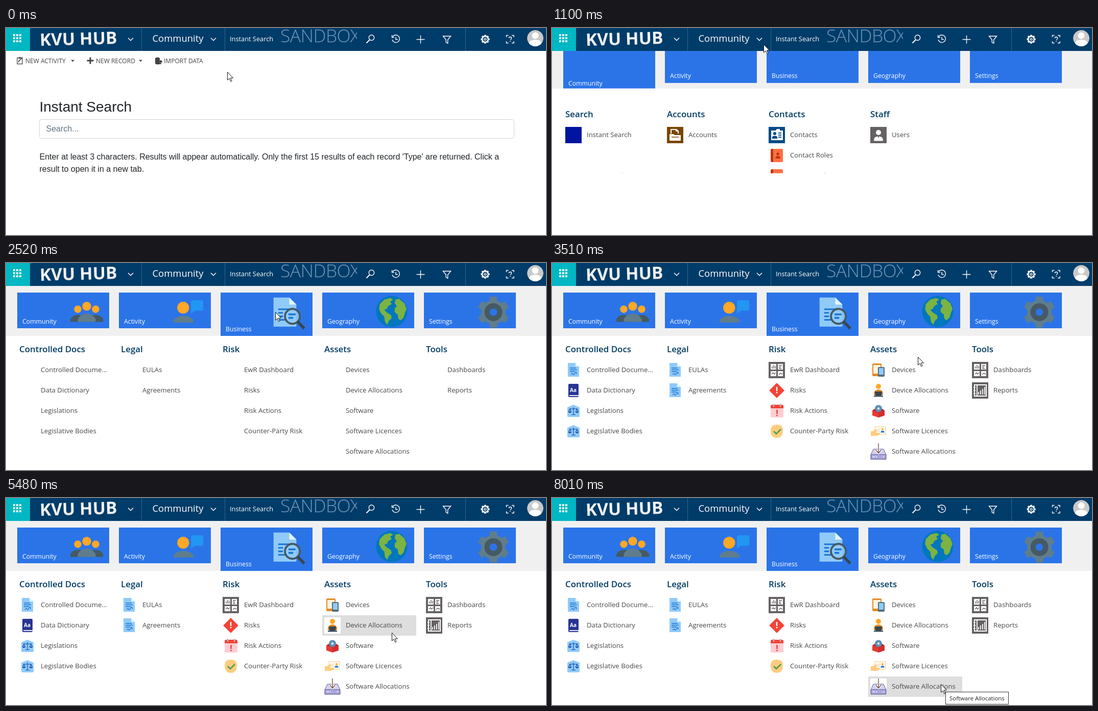
These frames come from a looping animation (1057x406 px, 8.46 s). An HTML page:

```html
<!DOCTYPE html>
<html lang="en">
<head>
<meta charset="utf-8">
<title>Instant Search</title>
<style>
html, body { margin: 0; width: 100%; height: 100%; overflow: hidden; background: #fff; }
svg { display: block; }
text { font-family: "Open Sans", "Noto Sans", sans-serif; white-space: pre; }
.page { font: 16px "Liberation Sans", Arial, sans-serif; fill: #212529; }
.head { font-size: 16.9px; font-weight: 600; fill: #003a63; }
.item { font-size: 13.2px; fill: #484848; }
.label { font-size: 12.3px; font-weight: 500; fill: #fff; }
.cmd { font-size: 12px; fill: #444; }
.tip { font-size: 11.4px; fill: #222; }
.line { fill: none; stroke: #fff; stroke-width: 1.4; }
</style>
</head>
<body>
<svg id="stage" width="1057" height="406" viewBox="0 0 1057 406"></svg>
<script>
const LOOP = 8460;
const BLUE = '#2b74e8';
const stage = document.getElementById('stage');

const rect = (x, y, w, h, fill, more = '') => `<rect x="${x}" y="${y}" width="${w}" height="${h}" fill="${fill}" ${more}/>`;
const circle = (x, y, r, fill, more = '') => `<circle cx="${x}" cy="${y}" r="${r}" fill="${fill}" ${more}/>`;
const path = (d, fill, more = '') => `<path d="${d}" fill="${fill}" ${more}/>`;
const stroke = (d, color, w = 1.5) => path(d, 'none', `stroke="${color}" stroke-width="${w}"`);
const text = (x, y, cls, s, more = '') => `<text x="${x}" y="${y}" class="${cls}" ${more}>${s}</text>`;
const group = (x, y, body, more = '') => `<g transform="translate(${x} ${y})" ${more}>${body}</g>`;
const bust = (x, y, r, head, body) => circle(x, y, r, head) +
  path(`M${x - 1.75 * r} ${y + 3.3 * r}v${-0.5 * r}q0 ${-1.3 * r} ${1.75 * r} ${-1.3 * r}t${1.75 * r} ${1.3 * r}v${0.5 * r}z`, body);
const gear = (x, y, r, n, fill) => {
  let out = circle(x, y, r * 0.78, fill);
  for (let i = 0; i < n; i++)
    out += path(`M${x - r * 0.27} ${y - r * 0.7}L${x - r * 0.21} ${y - r}H${x + r * 0.21}L${x + r * 0.27} ${y - r * 0.7}z`, fill,
      `transform="rotate(${i * 360 / n} ${x} ${y})"`);
  return out;
};

// Artwork of the big tiles, each in a 48 by 48 box
const shoulders = (x, w, top, fill) => path(`M${x - w} 38v-3.500s${w * 0.28}-${34.5 - top} ${w}-${34.5 - top}s${w} ${34.5 - top} ${w} ${34.5 - top}V38z`, fill);
const tiles = [
  ['Community',
    circle(12, 21, 5, '#ffa726') + circle(36, 21, 5, '#ffa726') +
    shoulders(12, 10, 28.4, '#455a64') + shoulders(36, 10, 28.4, '#455a64') +
    circle(24, 17, 6, '#ffa726') + shoulders(24, 12, 27, '#607d8b')],
  ['Activity',
    circle(17, 19, 8, '#ffa726') + path('M4 39v-2c0-2 4-7 13-7s14 5 14 7v2z', '#607d8b') +
    path('M30 9h12q2 0 2 2v10q0 2-2 2h-9l-5.500 4V11q0-2 2.500-2z', '#2196f3')],
  ['Business',
    path('M5 4h20l9 9v28H5z', '#90caf9') + path('M25 4v9h9z', '#e1f5fe') +
    stroke('M11 19h17M11 23.500h6M11 28h6M11 32.500h9', '#1976d2', 2) +
    circle(29, 28, 9.500, '#90caf9', 'fill-opacity=".85" stroke="#455a64" stroke-width="2.500"') +
    stroke('M24 25.500h9M24 30h6', '#1976d2', 2.4) + stroke('M35.500 34.500l8.500 9', '#37474f', 3.6)],
  ['Geography',
    circle(24, 24, 21, '#0277bd') +
    path('M8 14l6-6 8-2 4 2-4 3 2 3-5 3-1 3-4 2 3 3 6 4 1 4-4 4-2 5-3-4-1-7-4-4-3-6z', '#7cb342') +
    path('M29 8l5-1 7 6 3 8-2 4-2 7-4 4-3-2-1-6-4-3v-5l3-3-3-4z', '#7cb342')],
  ['Settings',
    gear(24, 25, 21, 6, '#607d8b') + circle(24, 25, 8.5, BLUE, 'stroke="#455a64" stroke-width="7"')]
];

// Small icons, each in a 32 by 32 box
const paper = path('M5 2h15l7 7v20H5z', '#90caf9') + path('M20 2v7h7z', '#e1f5fe');
const box = (fill, body) => rect(0, 0, 32, 32, fill) + body;
const bang = (x, y, fill) => rect(x - 1.3, y, 2.6, 8, fill) + circle(x, y + 11, 1.6, fill);
const icons = {
  search: rect(2, 2, 28, 28, 'url(#sky)', 'rx="6"') + circle(15.5, 15.5, 7, 'none', 'stroke="#fff" stroke-width="2.4"') + stroke('M20 20l4.5 4.5', '#fff', 3),
  accounts: box('#7b4500', path('M7 13V4h12l4 4v5h-2V9h-4V6H9v7zM5 14h8l2 2h12v11H5z', '#fff') + stroke('M11 10h7M9 20h14', '#7b4500', 1.5)),
  contacts: box('#004b87', path('M5 7h9l2-3h6v3h6v19H5z', '#fff') + bust(12, 13, 3, '#004b87', '#004b87') + stroke('M19 12h6M19 16h6M19 20h6', '#004b87', 2)),
  role: rect(5, 3, 23, 26, '#ff7043', 'rx="2"') + path('M7 3h2v26H7q-3 0-3-3V6q0-3 3-3z', '#bf360c') + bust(18, 13, 2.7, '#bf360c', '#bf360c'),
  user: box('#666264', bust(16, 11, 5, '#fff', '#fff') + path('M14 17l2 5 2-5z', '#666264')),
  doc: paper + stroke('M9 12h12M9 15.500h14M9 19h10', '#1976d2', 1.4) + stroke('M11 25q3-4 4-1t4-2 3 2', '#1565c0', 1.2),
  dict: rect(6, 3, 20, 26, '#283593', 'rx="2"') + stroke('M8 26h18', '#e8eaf6', 2) + text(9, 19, 'aa', 'Aa', 'fill="#fff" font-size="10" font-weight="700"'),
  law: path('M16 4l12 5v17q0 2-2 2H6q-2 0-2-2V9z', '#90caf9') + stroke('M16 9v14M9 12h14M12 23.500h8M9 12l-2.500 6h5zM23 12l-2.500 6h5z', '#0d47a1', 1.1) + path('M6 18h6q-3 4-6 0M20 18h6q-3 4-6 0', '#0d47a1'),
  dash: box('#666264', rect(4, 4, 11, 11, '#fff') + rect(18, 4, 10, 11, '#fff') + rect(4, 18, 11, 10, '#fff') + rect(18, 18, 10, 10, '#fff') +
    stroke('M7 13V9M10 13V6M13 13V8M20 7h6M20 10h4M20 13h5M6 24l3-3 2 3 3-3M20 25l3-3 4 2', '#666264', 1.4)),
  risk: path('M16 2.500l13.500 13.500-13.500 13.500L2.500 16z', '#f44336', 'stroke="#f44336" stroke-linejoin="round" stroke-width="2"') + bang(16, 9, '#fff'),
  cal: rect(4, 5, 25, 24, '#ffcdd2', 'rx="2"') + path('M4 11V7q0-3 3-3h19q3 0 3 3v4z', '#f44336') + stroke('M10 2v6M23 2v6', '#b0bec5', 2.4) + bang(16.5, 14, '#f44336'),
  check: path('M16 3q12 0 12 11 0 15-12 15T4 14Q4 3 16 3z', '#ffcc80') + stroke('M10 16l5 5 9-9', '#43a047', 2.6),
  device: rect(4, 3, 18, 25, '#e38b28', 'rx="2"') + rect(6, 6, 14, 17, '#fff3e0') + rect(15, 10, 13, 19, '#546e7a', 'rx="2"') + rect(17, 12, 9, 13, '#90caf9'),
  worker: circle(16, 8, 5, '#ffa726') + path('M7 25v-4q2-7 9-7t9 7v4z', '#e58a2b') + path('M9 18h14l-1 9H10z', '#37474f') + rect(7, 26, 18, 2.5, '#455a64'),
  disc: path('M4 15l5-3h14l5 3-12 5z', '#b71c1c') + circle(16, 11.5, 7, '#5f8fb8') + circle(16, 11.5, 2.3, '#e3f2fd') + path('M4 15l12 4 12-4v10l-12 4-12-4z', '#e53935') + path('M16 19l12-4v10l-12 4z', '#d32f2f'),
  card: rect(9, 7, 21, 15, '#fffaf0', 'stroke="#ffcc80"') + bust(24, 12, 2, '#ffa726', '#1976d2') + stroke('M14 12h5M14 16h5', '#cfc4ba', 1.2) + path('M1 16h4l6-4 3 2-3 5h8v3l-6 3H1z', '#ffcc80'),
  drive: path('M6 11h20l5 11v9H1v-9z', '#d3d1f2', 'stroke="#6a6698"') + rect(1.5, 21.5, 29, 9, '#aaa7dd', 'stroke="#6a6698"') + stroke('M5 26h4M11 26h2M25 26h2', '#fff', 1.6) + stroke('M16 0v18M11 13l5 6 5-6', '#fff', 4) + stroke('M16 0v18M11 13l5 6 5-6', '#795548', 1.5),
  report: box('#666264', rect(5, 5, 23, 22, 'none', 'stroke="#fff" stroke-width="2"') + stroke('M10 5v22M13 24v-5M17 24v-8M21 24V13M25 24V9M3 10h4M3 16h4M3 22h4', '#fff', 1.8))
};

const menus = {
  community: [
    ['Search', 'search:Instant Search'],
    ['Accounts', 'accounts:Accounts'],
    ['Contacts', 'contacts:Contacts', 'role:Contact Roles', 'role:Contact Role Types'],
    ['Staff', 'user:Users']
  ],
  business: [
    ['Controlled Docs', 'doc:Controlled Docume...', 'dict:Data Dictionary', 'law:Legislations', 'law:Legislative Bodies'],
    ['Legal', 'doc:EULAs', 'doc:Agreements'],
    ['Risk', 'dash:EwR Dashboard', 'risk:Risks', 'cal:Risk Actions', 'check:Counter-Party Risk'],
    ['Assets', 'device:Devices', 'worker:Device Allocations', 'disc:Software', 'card:Software Licences', 'drive:Software Allocations'],
    ['Tools', 'dash:Dashboards', 'report:Reports']
  ]
};

const drawMenu = (columns) => columns.map(([title, ...items], c) => {
  const x = 26 + 199 * c;
  return text(x, 174.5, 'head', title) + items.map((entry, r) => {
    const [icon, label] = entry.split(':');
    return group(x, 194 + 40 * r, icons[icon], 'class="icon"') + text(x + 42, 214 + 40 * r, 'item', label);
  }).join('');
}).join('');

const drawTiles = (active) => tiles.map(([label, art], i) => {
  const on = i === active;
  const place = on ? 'translate(96 3.5) scale(1.54)' : 'translate(101 2) scale(1.458)';
  return group(22 + 199 * i, 58,
    rect(0, 0, 180, on ? 85 : 70, BLUE, `class="tile${i}"`) +
    `<g class="art" transform="${place}">${art}</g>` + text(10, on ? 75.5 : 60.5, 'label', label));
}).join('');

const chevron = (x) => stroke(`M${x - 5} 19.5l5 5 5-5`, '#fff', 1.5);
const caret = (x) => path(`M${x - 3.5} 62.5h7l-3.5 4z`, '#555');
const dots = [0, 1, 2].flatMap(r => [0, 1, 2].map(c => rect(14 + 6 * c, 12 + 6 * r, 4, 4, '#fff'))).join('');

const header = rect(0, 0, 1057, 45, '#003c69') + rect(0, 0, 47, 45, '#00b7c3') + dots +
  [265, 428, 899].map(x => rect(x, 0, 1, 45, '#33638a')).join('') +
  text(66, 33, 'logo', 'KVU HUB', 'fill="url(#chalk)" font-size="33.5" font-weight="700" transform="rotate(-1.5 140 22)"') +
  chevron(244) + chevron(406) +
  text(286.5, 27, 'big', 'Community', 'fill="#fff" font-size="18.4"') +
  text(438, 26, 'label', 'Instant Search', 'style="font-size:12.8px"') +
  `<g clip-path="url(#sandClip)">${text(537, 28, 'sand', 'SANDBOX', 'fill="#6c96b9" font-size="35.5" font-weight="300" letter-spacing="-.6"')}</g>` +
  `<g class="line">
    <circle cx="715.5" cy="19" r="5.2"/><path d="M712 23l-6.5 6.5" stroke-width="2"/>
    <path d="M757 17a7.3 7.3 0 1 1-1 6M755.5 14v4.5h4.5M763 17.5v5h4"/>
    <path d="M803.5 22.5h16M811.5 14.5v16"/>
    <path d="M855.5 16h15l-5.8 7v7l-3.4-2v-5z"/>
    <path d="M979.5 18v-3.5h4M990 14.5h4V18M994 26v3.5h-4M983.5 29.5h-4V26M984.5 20q0-2.500 2.500-2.500t2.500 2.300-2.500 3.700M987 25v1.800"/>
  </g>` +
  gear(938, 22, 8.5, 8, '#fff') + circle(938, 22, 4.6, '#003c69') + circle(938, 22, 2.6, '#fff') + circle(938, 22, 1.2, '#003c69') +
  `<g clip-path="url(#face)">${circle(1036, 20, 16, '#c9c9c9') + circle(1036, 15, 6.5, '#fff') + path('M1024 37v-8q2-6 12-6t12 6v8z', '#fff')}</g>`;

const commands = rect(22, 58.5, 10, 12, 'none', 'stroke="#444" stroke-width="1.3"') + rect(25, 57, 4, 3, '#444') +
  stroke('M24.500 67.500l1-3 7-6.500', '#444', 1.6) + text(38, 68.7, 'cmd', 'NEW ACTIVITY') + caret(130.5) +
  stroke('M158.500 64h13M165 57.500v13', '#444', 3) + text(176, 68.7, 'cmd', 'NEW RECORD') + caret(263.5) +
  path('M292 59q5-3 9 0v11q-4 3-9 0z', '#444') + stroke('M298 70h5v-5M300.500 67l2.500-3 2.500 3', '#222', 1.6) + text(309, 68.7, 'cmd', 'IMPORT DATA');

const page = commands + text(65.5, 164, 'page', 'Instant Search', 'style="font-size:28px"') +
  rect(65.5, 179.5, 929, 37, '#fff', 'rx="4" stroke="#ced4da"') +
  text(78.5, 203, 'page', 'Search...', 'style="fill:#5f7481"') +
  text(65.5, 258, 'page', "Enter at least 3 characters. Results will appear automatically. Only the first 15 results of each record 'Type' are returned. Click a") +
  text(65.5, 282, 'page', 'result to open it in a new tab.');

const gradient = (id, a, b) => `<linearGradient id="${id}" x2="0" y2="1"><stop stop-color="${a}"/><stop offset="1" stop-color="${b}"/></linearGradient>`;

stage.innerHTML = `<defs>
  ${gradient('sky', '#2ba8f7', '#0b66f0')}${gradient('chalk', '#fff', '#e4e4e4')}${gradient('shade', '#8f8f8f', '#f4f4f4')}
  <clipPath id="sandClip"><rect x="530" width="157" height="45"/></clipPath>
  <clipPath id="face"><circle cx="1036" cy="20" r="16"/></clipPath>
  <clipPath id="bandClip"><rect id="bandBox" y="45" width="1057"/></clipPath>
  <clipPath id="bodyClip"><rect id="bodyBox" y="76" width="1057"/></clipPath>
</defs>${page}
<g id="nav">
  <g clip-path="url(#bodyClip)">${rect(0, 76, 1057, 330, '#fff')}
    <g id="row">${rect(619, 190, 184, 40, '#dedede') + rect(623, 194, 32, 32, '#fff')}</g>
    <g id="community">${drawMenu(menus.community)}<rect id="blank" x="26" y="194" width="32" height="32" fill="#0014a0"/></g>
    <g id="business">${drawMenu(menus.business)}</g>
  </g>
  <rect id="shadow" y="332" width="1057" height="6" fill="url(#shade)"/>
  <g clip-path="url(#bandClip)">${rect(0, 45, 1057, 98, '#f0f0f0')}
    <g id="tilesA">${drawTiles(0)}</g><g id="tilesB">${drawTiles(2)}</g>
  </g>
</g>
${header}
<g id="tip"><rect x=".5" y=".5" height="24" fill="#fff" stroke="#333"/><text x="8" y="17" class="tip"></text></g>
<path id="cursor" d="M.5.5v15.700l3.600-3.400 2.700 6 2.300-1-2.600-5.800h5z" fill="#fff" stroke="#111"/>`;

// time, x, y of the pointer tip
const pointer = [
  [0, 433, 86], [100, 431, 80], [210, 427, 70], [320, 420, 55], [440, 411, 40], [550, 404, 28], [660, 400, 20], [770, 398, 16], [880, 400, 18],
  [980, 414, 32], [1530, 448, 36], [1650, 497, 51], [1750, 519, 69], [1860, 526, 84], [1970, 528, 93], [2080, 527, 96],
  [3070, 545, 102], [3180, 590, 120], [3290, 640, 146], [3400, 685, 168], [3510, 716, 184], [3620, 721, 195], [3730, 723, 201], [3850, 723, 204],
  [4510, 726, 210], [4610, 735, 225], [4720, 748, 243], [4830, 756, 253], [5480, 755, 264], [5590, 751, 280], [5700, 749, 290],
  [6370, 751, 302], [6470, 753, 315], [6590, 757, 322], [6710, 759, 324], [7360, 761, 350], [7480, 761, 365]
];
// start, end, width, label
const tips = [
  [4180, 4510, 57, 'Devices'], [5050, 5480, 113, 'Device Allocations'], [6150, 6370, 63, 'Software'],
  [7030, 7360, 110, 'Software Licences'], [8010, LOOP, 124, 'Software Allocations']
];
const opening = [[0, 0], [980, 0.32], [1100, 0.75], [1220, 1]];

const at = (table, t) => table.findLast(step => step[0] <= t);
const $ = (id) => document.getElementById(id);
const show = (el, on) => { el.style.display = on ? '' : 'none'; };
const move = (el, x, y) => el.setAttribute('transform', `translate(${x} ${y})`);
const all = (selector) => [...stage.querySelectorAll(selector)];
const tileArt = all('#tilesA .art'), businessIcons = all('#business .icon'), hotTile = all('#tilesA .tile2')[0];
const tipBox = $('tip').firstChild, tipText = $('tip').lastChild;

function draw(t) {
  const [, x, y] = at(pointer, t);
  const open = at(opening, t)[1];
  const swapped = t >= 2300;
  move($('cursor'), x, y);

  show($('nav'), open > 0);
  $('bandBox').setAttribute('height', 98 * open);
  $('bodyBox').setAttribute('height', swapped ? 330 : 67 + 189 * open);
  move($('tilesA'), 0, -81 * (1 - open));
  tileArt.forEach(el => show(el, open === 1));
  show($('blank'), open < 1);
  show($('shadow'), open === 1 && !swapped);
  show($('tilesA'), !swapped);
  show($('tilesB'), swapped);
  show($('community'), !swapped);
  show($('business'), t >= 2420);
  businessIcons.forEach(el => show(el, t >= 2530));
  hotTile.setAttribute('fill', t >= 1860 ? '#296fdd' : BLUE);

  show($('row'), swapped && y >= 190);
  move($('row'), 0, 40 * Math.floor((y - 190) / 40));

  const tip = tips.find(([from, to]) => t >= from && t < to);
  show($('tip'), tip);
  if (tip) {
    move($('tip'), x + 9, y + 15);
    tipBox.setAttribute('width', tip[2] - 1);
    tipText.textContent = tip[3];
  }
}

function tick() {
  draw(performance.now() % LOOP);
  requestAnimationFrame(tick);
}
tick();
</script>
</body>
</html>
```
